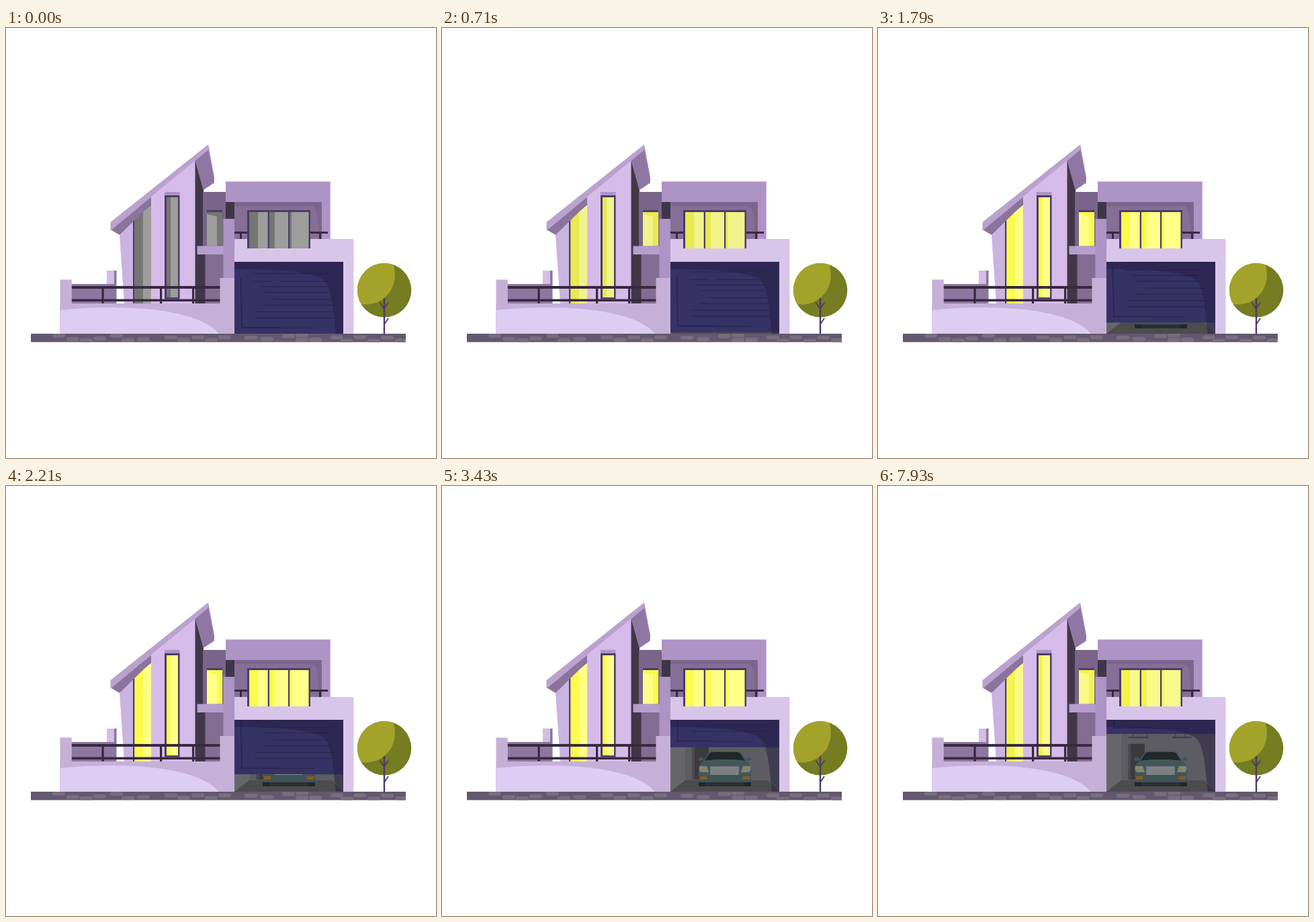
Animation, 640 px wide and 640 px high, one loop 8000 ms. Source, as an HTML page with a canvas:

```html
<!DOCTYPE html>
<html lang="en">
<head>
<meta charset="utf-8">
<title>House</title>
<style>
html, body { margin: 0; width: 100%; height: 100%; overflow: hidden; background: #fff; }
canvas { display: block; width: 640px; height: 640px; }
</style>
</head>
<body>
<canvas id="stage" width="640" height="640"></canvas>
<script>
const ctx = document.getElementById('stage').getContext('2d');
const LOOP = 8000, DOOR_TIME = 4070, DOOR_RISE = 86;
const FRAME = '#4c3d66', RAIL = '#38293f', WALL = '#c5b1d8', MAUVE = '#ae93c5';

function box(color, x1, y1, x2, y2) {
  ctx.fillStyle = color;
  ctx.fillRect(x1, y1, x2 - x1, y2 - y1);
}

function shape(color, d) {
  ctx.fillStyle = color;
  ctx.fill(new Path2D(d));
}

function line(color, width, d) {
  ctx.strokeStyle = color;
  ctx.lineWidth = width;
  ctx.stroke(new Path2D(d));
}

function pill(color, x, y, w, h, r) {
  ctx.fillStyle = color;
  ctx.beginPath();
  ctx.roundRect(x, y, w, h, r);
  ctx.fill();
}

function clipped(d, draw) {
  ctx.save();
  ctx.clip(new Path2D(d));
  draw();
  ctx.restore();
}

function mix(a, b, k) {
  return `rgb(${a.map((v, i) => Math.round(v + (b[i] - v) * k)).join()})`;
}

// Cubic Bezier easing (.61, 0, .89, 1), solved by bisection
function ease(u) {
  if (u >= 1) return 1;
  let lo = 0, hi = 1;
  for (let i = 0; i < 24; i++) {
    const s = (lo + hi) / 2, q = 1 - s;
    const x = 3 * s * q * q * 0.61 + 3 * s * s * q * 0.89 + s * s * s;
    if (x < u) lo = s; else hi = s;
  }
  return lo * lo * (3 - 2 * lo);
}

function lightLevel(t) {
  if (t >= 7930) return 0.94;
  const u = Math.min(1, Math.max(0, (t - 70) / 830));
  return u * u * (3 - 2 * u);
}

const STONES = [
  [69, 455], [90, 460], [110, 462], [130, 459], [155, 455], [172, 461.5],
  [195, 460], [236, 457.5], [255, 461], [276, 457.5], [296, 461.5], [316, 457.5],
  [355, 458], [379, 460], [411, 455.5], [431, 454], [431, 461], [451, 461],
  [483, 457.5], [498, 462.5], [517, 457.5], [538, 462.5], [558, 458], [579, 462]
];

function ground() {
  box('#63586f', 37, 455, 595, 467.5);
  clipped('M37 455H595V467.5H37Z', () => {
    for (const [x, y] of STONES) pill('#776d7e', x, y, 19, 6, 3);
  });
}

function tree() {
  const crown = 'M603.3 390.3A40.2 40.2 0 1 1 522.9 390.3A40.2 40.2 0 1 1 603.3 390.3Z';
  shape('#757c21', crown);
  clipped(crown, () =>
    shape('#a3a32b', 'M574 345C583 366 579 386 566 399C555 410 541 413 526 411L515 400V345Z'));
  line('#4f3a68', 2.4, 'M563 402V455');
  line('#4f3a68', 1.8, 'M563 418L556.5 408.5M563 417L569.5 408.5M563 441L569 432');
}

function tower(dim, lit) {
  box('#8d779f', 97, 381, 164.5, 410);
  box('#d3bfe5', 150, 361, 161, 381);
  box('#8d759e', 161, 361, 164.5, 381);

  shape('#c9b3e1', 'M168.5 301L190 280V410H176Z');
  shape('#d6bbea', 'M189 276L216 252L282 197V410H189Z');
  shape('#413748', 'M281.5 196L294 241V330L297 337V410H281.5Z');

  // Slanted window
  shape(FRAME, 'M189 282L216 259V410H189Z');
  shape(lit, 'M191.5 284L216 263V410H191.5Z');
  shape(dim, 'M191.5 284L204 273.3V410H191.5Z');

  // Roof
  shape('#8c739e', 'M155.5 300L216 250V262L169 308Z');
  shape('#8f76a3', 'M301 180L309.7 222V230.5L294 241L281.5 197Z');
  shape('#baa2cf', 'M155.5 289L301 173.3V181.5L157 300.5L155.5 301Z');
  shape('#a58abb', 'M301 173.3L310 222V230L309 230V222L301 182Z');

  // Narrow window
  box(MAUVE, 236, 244, 258.5, 249);
  box(FRAME, 236, 249, 258.5, 403.5);
  box(lit, 239, 252, 256, 401);
  box(dim, 239, 252, 245, 401);
}

function middle(dim, lit) {
  box('#79648a', 293, 244, 328, 325);
  box(FRAME, 299, 271, 322, 274);
  box(dim, 299, 274, 322, 324.5);
  shape(lit, 'M299 277L314 280.5V324.5H299Z');
  box('#846d93', 296.5, 337, 324, 410);
  box('#b79dce', 284.5, 324.5, 327, 337);
}

function upperFloor(dim, lit) {
  box(MAUVE, 327, 228.5, 482.7, 314);
  box('#7c658c', 340, 259, 470, 314);
  shape('#866f97', 'M340 265H452Q461 265 463 274L467 314H340Z');
  box('#3f3548', 327, 259, 340, 284);
  box(RAIL, 340, 303, 360, 306);
  box(RAIL, 452, 303, 479, 306);
  box(RAIL, 348, 306, 351, 314);
  box(RAIL, 466, 306, 469, 314);
  box('#d8c6ea', 340, 314, 517.5, 455);
  box(FRAME, 359, 271, 453, 328);
  for (const [x, shade, end] of [[362, 375, 389.7], [392, 400, 420], [422.5, 425, 450.5]]) {
    box(lit, x, 274, end, 328);
    box(dim, x, 274, shade, 328);
  }
}

function car() {
  for (const x of [382, 449]) pill('#25262a', x, 437, 11, 10, 1.5);
  box('#2d2e31', 392, 440, 450, 447);
  for (const x of [385.5, 456.5]) {
    ctx.fillStyle = '#44575b';
    ctx.beginPath();
    ctx.ellipse(x, 406.5, 3.8, 2.6, 0, 0, Math.PI * 2);
    ctx.fill();
  }
  shape('#435559', 'M388 411L396 398Q398 395 404 395H438Q444 395 446 398L454 411Z');
  shape('#222829', 'M391 409L398 398Q400 396 404 396H438Q442 396 444 398L451 409Q421 405 391 409Z');
  shape('#43575b', 'M382 432C381 419 383 412 390 409Q421 405 452 409C459 412 461 419 460 432Z');
  line('#394b4f', 0.8, 'M392 411L399 417M450 411L443 417');
  shape('#81876d', 'M383 417H394L397 426H385Q382 423 383 417Z');
  shape('#81876d', 'M459 417H448L445 426H457Q460 423 459 417Z');
  pill('#74797b', 399, 417, 43, 13, 1.5);
  for (let y = 419.5; y < 430; y += 2.5) line('#8c9091', 0.8, `M400 ${y}H441`);
  pill('#3e5457', 382, 430, 78, 11, 2);
  pill('#8a5a1c', 384, 432, 10.5, 5, 1);
  pill('#8a5a1c', 447.5, 432, 10.5, 5, 1);
}

function garageRoom() {
  box('#5c5c62', 340, 348, 502, 455);
  shape('#66666a', 'M340 348H362V438L340 455Z');
  shape('#4c4c4d', 'M340 455L362 438H484L502 455Z');
  box('#4b4b4f', 372, 384, 377, 437);
  box('#3b3b3e', 376, 383.5, 397, 437);
  box('#403e49', 373, 373, 403, 375.3);
  box('#403e49', 438, 373, 467, 375.3);
  for (const x of [379, 400, 442, 456]) box('#403e49', x, 366, x + 1.2, 373);
  car();
}

const SLATS = [
  [365.5, 368, 486], [377, 368, 396], [377, 410, 480], [385, 378, 487], [393.5, 384, 480],
  [404, 398, 488], [412.5, 384, 488], [422.5, 371, 488], [431.5, 370, 488]
];

function garage(rise) {
  clipped('M340 348H502V455H340Z', () => {
    garageRoom();
    ctx.save();
    ctx.translate(0, -rise);
    box('#373265', 340, 340, 502, 455);
    for (const [y, x1, x2] of SLATS) line('#29234c', 1.1, `M${x1} ${y}H${x2}`);
    line('#29234c', 1.4, 'M349.5 372L351 446H407');
    line('#29234c', 1, 'M407 446.5H459');
    ctx.restore();
    shape('rgba(38,29,67,.5)',
      'M340 359C400 359 463 362 476 378C486 392 488 428 491 455H502V348H340Z');
  });
}

function front() {
  box(MAUVE, 323.5, 284, 340, 372);
  box(RAIL, 97, 384, 319, 388);
  box(RAIL, 97, 403.5, 319, 407);
  for (const x of [142.5, 229, 277]) box(RAIL, x, 387, x + 3.2, 410);
  box(WALL, 80.5, 374.5, 97.8, 455);
  box(WALL, 80.5, 410, 340, 455);
  box(WALL, 318.5, 372, 340, 455);
  shape('#decdf2', 'M80.5 420C180 410 286 418 317 455H80.5Z');
}

function render(t) {
  const glow = lightLevel(t);
  const dim = mix([117, 117, 115], [251, 251, 76], glow);
  const lit = mix([157, 157, 155], [255, 255, 136], glow);
  box('#fff', 0, 0, 640, 640);
  ground();
  tree();
  tower(dim, lit);
  middle(dim, lit);
  upperFloor(dim, lit);
  garage(DOOR_RISE * ease(t / DOOR_TIME));
  front();
}

const start = performance.now();
function tick() {
  render((performance.now() - start) % LOOP);
  requestAnimationFrame(tick);
}
tick();
</script>
</body>
</html>
```
